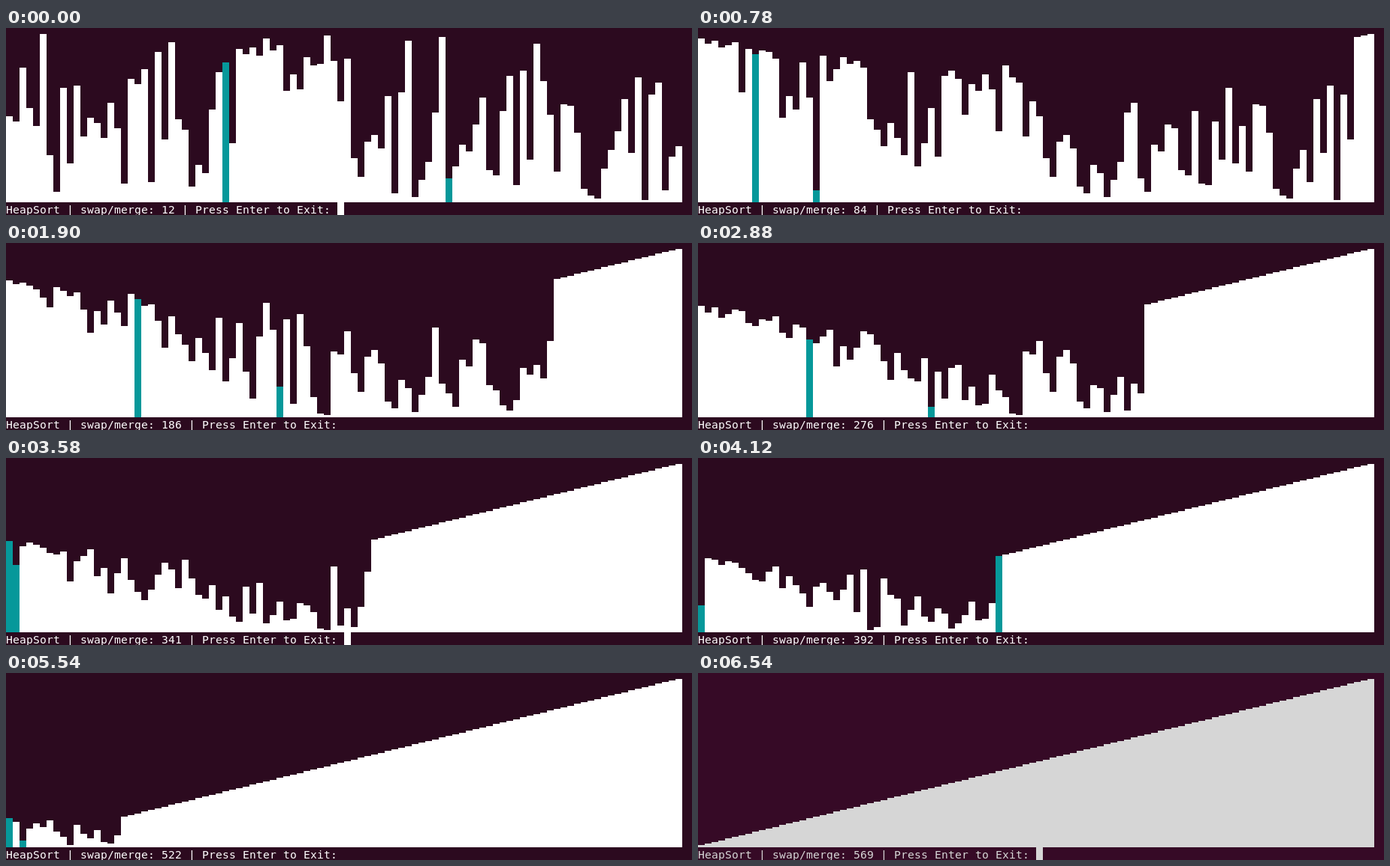
An HTML page with a canvas that plays this animation: 913 px wide and 250 px high, repeating every 6640 ms.

```html
<!DOCTYPE html>
<html lang="en">
<head>
<meta charset="utf-8">
<title>HeapSort</title>
<style>
  html, body { margin: 0; width: 100%; height: 100%; overflow: hidden; background: #2c0a1f; }
  canvas { display: block; }
</style>
</head>
<body>
<canvas id="stage" width="913" height="250"></canvas>
<script>
const LOOP = 6640;
const DIM_AT = 6540;
const DONE_AT = 6060;
const CELL = 9;
const FLOOR = 233;
const UNIT = 2.25;
const FIRST_COUNT = 12;
const LAST_COUNT = 569;
const FIRST_NODE = 31;

const NORMAL = { back: '#2c0a1f', fore: '#ffffff', mark: '#06989a' };
const DIM = { back: '#360a26', fore: '#d6d6d6', mark: '#06989a' };

// The array as it stands when the loop begins, partly heapified.
const START = [
  51, 48, 80, 56, 45, 100, 28, 6, 68, 23, 69, 39, 50, 47, 38, 59, 44, 11, 73, 70,
  79, 12, 89, 37, 95, 49, 43, 9, 22, 17, 55, 77, 83, 35, 91, 88, 92, 87, 97, 90,
  93, 66, 76, 67, 86, 81, 82, 99, 84, 60, 85, 26, 15, 36, 40, 32, 63, 5, 65, 96,
  3, 13, 24, 53, 98, 14, 21, 34, 30, 46, 62, 19, 16, 54, 75, 10, 78, 25, 94, 72,
  52, 18, 58, 57, 41, 8, 4, 2, 20, 31, 42, 61, 29, 74, 1, 64, 71, 7, 27, 33
];

// Pace of the sort: time in ms, number of swaps done.
const PACE = [[0, FIRST_COUNT], [780, 84], [1900, 186], [2880, 276],
              [3580, 341], [4720, 449], [DONE_AT, LAST_COUNT]];

// Screen refreshes come in runs; each run begins at one of these times.
const RUNS = [20, 720, 1420, 2120, 2820, 3520, 4200, 4900, 5580];

function recordSort() {
  const a = START.slice();
  const states = [{ bars: a.slice(), pair: [32, 65] }];

  function swap(i, j) {
    [a[i], a[j]] = [a[j], a[i]];
    states.push({ bars: a.slice(), pair: [i, j] });
  }

  function siftDown(i, size) {
    for (;;) {
      let child = 2 * i + 1;
      if (child >= size) return;
      if (child + 1 < size && a[child + 1] > a[child]) child++;
      if (a[i] >= a[child]) return;
      swap(i, child);
      i = child;
    }
  }

  for (let i = FIRST_NODE; i >= 0; i--) siftDown(i, a.length);
  for (let end = a.length - 1; end > 0; end--) {
    swap(0, end);
    siftDown(0, end);
  }
  return { states, sorted: { bars: a, pair: [] } };
}

function refreshTimes() {
  const times = [0];
  RUNS.forEach((start, r) => {
    const last = r === RUNS.length - 1;
    const end = last ? DONE_AT : RUNS[r + 1] - 40;
    const gaps = last ? 15 : 21;
    const shift = r < 5 ? 9 : 1;
    for (let i = 0; i <= gaps; i++) {
      const t = i * (end - start) / gaps + shift;
      times.push(start + 20 * Math.floor(t / 20));
    }
  });
  return times;
}

function swapsAt(t) {
  if (t >= DONE_AT) return LAST_COUNT;
  const k = PACE.findIndex(p => p[0] > t);
  const [t0, n0] = PACE[k - 1];
  const [t1, n1] = PACE[k];
  return Math.round(n0 + (n1 - n0) * (t - t0) / (t1 - t0));
}

function cursorOn(t) {
  if (t >= DIM_AT) return false;
  return (Math.min(t, DONE_AT) + 270) % 1200 < 600;
}

const ctx = document.getElementById('stage').getContext('2d');
const { states, sorted } = recordSort();
const refreshes = refreshTimes();

function draw(t) {
  const shown = refreshes.findLast(r => r <= t);
  const count = swapsAt(shown);
  const index = Math.min(count - FIRST_COUNT, states.length - 1);
  const { bars, pair } = count === LAST_COUNT ? sorted : states[index];
  const colors = t >= DIM_AT ? DIM : NORMAL;

  ctx.fillStyle = colors.back;
  ctx.fillRect(0, 0, 913, 250);

  bars.forEach((value, i) => {
    const top = Math.floor(FLOOR - UNIT * value);
    ctx.fillStyle = pair.includes(i) ? colors.mark : colors.fore;
    ctx.fillRect(i * CELL, top, CELL, FLOOR - top);
  });

  // Status line, one character per terminal cell.
  const line = `HeapSort | swap/merge: ${count} | Press Enter to Exit: `;
  ctx.fillStyle = colors.fore;
  ctx.font = '14.67px "DejaVu Sans Mono", monospace';
  [...line].forEach((ch, i) => ctx.fillText(ch, i * CELL, 247.5));
  if (cursorOn(shown)) ctx.fillRect(line.length * CELL, FLOOR, CELL, 17);
}

const begin = performance.now();
function tick() {
  draw((performance.now() - begin) % LOOP);
  requestAnimationFrame(tick);
}
tick();
</script>
</body>
</html>
```
